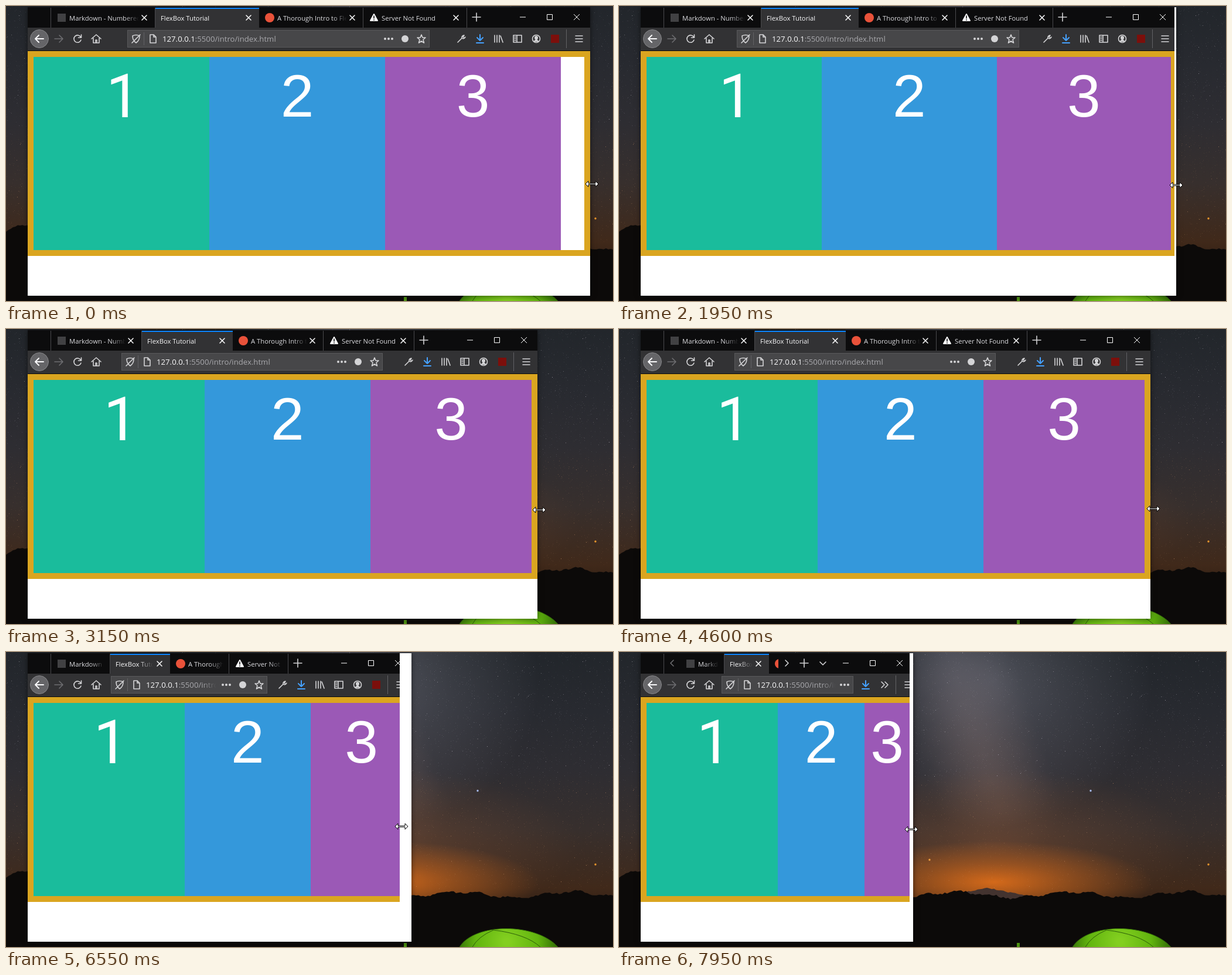
An HTML page with a canvas that plays this animation: 1036 by 504 pixels, repeating every 8000 ms.

```html
<!DOCTYPE html>
<html lang="en">
<head>
<meta charset="utf-8">
<title>Resizing a flexbox page</title>
<style>
html, body { margin: 0; width: 100%; height: 100%; overflow: hidden; background: #111; }
div, span, svg, canvas { position: absolute; box-sizing: border-box; }
#stage { left: 0; top: 0; width: 1036px; height: 504px; overflow: hidden; font: 11.25px 'Open Sans', 'Noto Sans', sans-serif; }
#win { left: 37px; top: 2px; height: 493px; background: #fff; box-shadow: 0 1px 9px rgba(0,0,0,.55); }
#clip { height: 493px; overflow: hidden; }
#chrome { height: 75px; background: #0c0c0d; }
#strip { top: 0; height: 35px; overflow: hidden; }
#edge { left: 39px; top: 1px; width: 1px; height: 34px; background: #4a4a4d; }
.tab { top: 1px; height: 34px; color: #dcdce0; border-right: 1px solid #4a4a4d; }
.tab.on { background: #323234; border-top: 2px solid #0a84ff; border-right: 0; color: #f9f9fa; }
.tab.on > * { margin-top: -2px; }
.label { top: 9px; line-height: 17px; white-space: nowrap; overflow: hidden; }
#tools { top: 35px; height: 39px; background: #323234; }
#bar { top: 4px; height: 30px; background: #474749; border: 1px solid #59595b; }
#url { left: 59px; top: 4px; font-size: 13.2px; line-height: 21px; color: #a9a9ad; }
#url b { font-weight: 400; color: #f9f9fa; }
.line { width: 1px; background: #626265; }
.end { right: 0; top: 0; }
.i { width: 16px; height: 16px; overflow: visible; fill: none; stroke: #d4d4d6; stroke-width: 1.6; stroke-linejoin: round; stroke-linecap: round; }
.thin { stroke: #fff; stroke-width: 1; stroke-linecap: butt; stroke-linejoin: miter; }
.bright { stroke: #f9f9fa; }
.dim { stroke: #6d6d70; }
.blue { stroke: #45a1ff; stroke-width: 2; }
.solid { fill: #d4d4d6; stroke: none; }
.small .wide, .big .slim, .room .more, .crowd .less { display: none; }
#page { top: 75px; height: 350px; border: 10px solid #daa520; background: #fff; display: flex; }
#page div { position: relative; width: 300px; padding: 10px; text-align: center;
  color: #fff; font: 102px/115px 'Liberation Sans', Arial, sans-serif; }
#page span { position: relative; left: 3px; font-family: Roboto, sans-serif; font-size: 104px; }
#cursor { width: 24px; height: 14px; fill: #fff; stroke: #000; }
</style>
</head>
<body>
<div id="stage">
  <canvas id="sky" width="1036" height="504"></canvas>
  <div id="win"><div id="clip">
    <div id="chrome"></div>
    <div id="page">
      <div style="background:#1abc9c;flex-shrink:1"><span>1</span></div>
      <div style="background:#3498db;flex-shrink:2">2</div>
      <div style="background:#9b59b6;flex-shrink:3">3</div>
    </div>
  </div></div>
  <svg id="cursor" viewBox="-12 -7 24 14"><path d="M-11 0l5-5v4h12v-4l5 5-5 5v-4h-12v4z"/></svg>
</div>
<script>
const $ = id => document.getElementById(id);

// Icon centred on x, y; a negative x counts from the right edge.
const icon = (x, y, d, cls = '', extra = '') =>
  `<svg class="i ${cls}" style="${x < 0 ? 'right' : 'left'}:${Math.abs(x) - 8}px;top:${y - 8}px" viewBox="-8 -8 16 16"><path d="${d}"/>${extra}</svg>`;
const dot = (x, r) => `M${x - r} 0a${r} ${r} 0 1 0 ${2 * r} 0a${r} ${r} 0 1 0 ${-2 * r} 0z`;
const square = color => `<rect x="-7" y="-7" width="14" height="14" fill="${color}" stroke="none"/>`;
const cross = 'M-4-4L4 4M4-4L-4 4', plus = 'M-7 0H7M0-7V7', more = dot(-6, 2) + dot(0, 2) + dot(6, 2);
const back = 'M7 0H-7M-1-6L-7 0-1 6', download = 'M0-7V3M-5-2L0 3 5-2M-6 7H6';

const tabs = [
  ['Markdown - Numbered Lists', icon(18, 17, '', '', square('#414143'))],
  ['FlexBox Tutorial', ''],
  ['A Thorough Intro to Flexing', icon(18, 17, '', '', '<circle r="8" fill="#e9523a" stroke="none"/>')],
  ['Server Not Found', icon(18, 17, 'M0-6L6 5H-6z', 'bright', '<path d="M0-6L6 5H-6z" fill="#f9f9fa"/><path d="M0-3V1M0 3.6V4" stroke="#0c0c0d"/>')]
];

$('chrome').innerHTML =
  '<div id="strip">' + tabs.map(([name, art], i) =>
    `<div class="tab ${i == 1 ? 'on' : ''}">${art}<div class="label" style="left:${art ? 31 : 9}px">${name}</div>` +
    `<div class="x end">${icon(-18, 17, cross, 'bright')}</div></div>`).join('') + '</div>' +
  '<div id="edge"></div>' +
  `<div class="more">${icon(53, 17, 'M3-5L-2 0 3 5', 'dim')}</div>` +
  `<div id="after">${icon(16, 17, plus, 'less')}<div class="more">${icon(14, 17, 'M-2-5L3 0-2 5')}${icon(44, 17, plus)}${icon(76, 17, 'M-5-2L0 3 5-2')}</div></div>` +
  icon(-115, 17, 'M-5 0H5', 'thin') + icon(-69, 17, 'M-4.5-4.5h9v9h-9z', 'thin') + icon(-23, 17, 'M-5-5L5 5M5-5L-5 5', 'thin') +
  '<div id="tools">' +
    icon(20, 19, '', 'bright', `<circle r="15.5" fill="#656568" stroke="#858588" stroke-width="1"/><path d="${back}" stroke-width="2"/>`) +
    icon(53, 19, 'M-7 0H7M1-6L7 0 1 6', 'dim') +
    icon(85, 19, 'M5.5-3A6.2 6.2 0 1 0 6 2M6.5-7V-2H1.5') +
    icon(117, 19, 'M-8 0L0-7 8 0M-5-1V7H5V-1M-1 7V2H1V7') +
    '<div id="bar">' +
      icon(14, 14, 'M-6-5Q0-8 6-5Q6 3 0 7Q-6 3-6-5M-7 7L7-7') +
      '<div class="line" style="left:27px;top:3px;height:22px"></div>' +
      icon(43, 14, 'M-5-7H1L5-3V7H-5zM1-7V-3H5') +
      '<div id="url" class="label"><b>127.0.0.1</b>:5500/intro/index.html</div>' +
      `<div class="wide end">${icon(-69, 14, more, 'solid')}${icon(-41, 14, dot(0, 6), 'solid')}` +
        icon(-13, 14, 'M0-7L2-2 7-2 3 1.5 4.5 7 0 4-4.5 7-3 1.5-7-2-2-2z') + '</div>' +
      `<div class="slim end">${icon(-14, 14, more, 'solid')}</div>` +
    '</div>' +
    '<div class="wide end">' +
      icon(-220, 19, 'M-6 6L1-1M1-1A4 4 0 0 1 5-6L3-3 5-1 7-3A4 4 0 0 1 1-1') +
      icon(-188, 19, download, 'blue') +
      icon(-156, 19, 'M-7-6V6M-3-6V6M1-6V6M3-5L7 6') +
      icon(-124, 19, 'M-7-6H7V6H-7zM-1-6V6M-5-3H-3M-5 0H-3M-5 3H-3') +
      icon(-92, 19, dot(0, 6.5), '', '<path class="solid" d="M-3-2a3 3 0 0 1 6 0Q3 1 1 2Q4 2 4 5H-4Q-4 2-1 2Q-3 1-3-2"/>') +
      icon(-60, 19, '', '', square('#7c0f0b')) + '</div>' +
    `<div class="slim end">${icon(-92, 19, download, 'blue')}${icon(-60, 19, 'M-5-5L0 0-5 5M1-5L6 0 1 5')}</div>` +
    '<div class="line" style="right:40px;top:3px;height:32px"></div>' +
    icon(-19, 19, 'M-6-5H6M-6 0H6M-6 5H6') +
  '</div>';

function paintSky() {
  const c = $('sky').getContext('2d');
  let seed = 7;
  const rnd = () => (seed = seed * 16807 % 2147483647) / 2147483647;
  const base = c.createLinearGradient(0, 0, 0, 504);
  ['#22262b', '#282a30', '#2e2d32', '#372f2d', '#40291a', '#1a100a']
    .forEach((col, i) => base.addColorStop(i / 5, col));
  c.fillStyle = base;
  c.fillRect(0, 0, 1036, 504);

  const glow = (x, y, rx, ry, rgb, a) => {
    c.save();
    c.translate(x, y);
    c.scale(rx, ry);
    const g = c.createRadialGradient(0, 0, 0, 0, 0, 1);
    g.addColorStop(0, `rgba(${rgb},${a})`);
    g.addColorStop(.45, `rgba(${rgb},${a * .5})`);
    g.addColorStop(1, `rgba(${rgb},0)`);
    c.fillStyle = g;
    c.fillRect(-1, -1, 2, 2);
    c.restore();
  };
  glow(640, 50, 270, 250, '150,150,165', .36);
  for (let i = 0; i < 7; i++) glow(560 + i * 15, i * 44, 110, 85, `${145 + i * 4},${142 - i * 3},${158 - i * 9}`, .17);
  glow(640, 330, 340, 130, '150,90,55', .4);
  glow(640, 393, 270, 70, '235,115,25', .85);

  // Fine stars, a few of them bright
  for (let i = 0; i < 7000; i++) {
    const far = rnd(), x = rnd() * 1036, y = rnd() * 405;
    c.fillStyle = `rgba(${y > 220 ? '205,150,105' : '195,190,200'},${.04 + .14 * far + .5 * far ** 40})`;
    c.fillRect(x | 0, y | 0, 1, 1);
  }
  const star = (x, y, col) => { c.fillStyle = col; c.beginPath(); c.arc(x, y, 1.7, 0, 7); c.fill(); };
  star(1006, 363, '#f59a2c');
  star(805, 237, '#a9bdf0');
  star(530, 355, '#f0a040');

  const land = (from, to, height, col) => {
    c.fillStyle = col;
    c.beginPath();
    c.moveTo(from, 504);
    for (let x = from; x <= to; x += 4) c.lineTo(x, height(x));
    c.lineTo(to, 504);
    c.fill();
  };
  land(560, 760, x => 402 + Math.abs(x - 628) * .2 + rnd() * 2, '#43332f');
  land(0, 1040, x => 413 - 5 * Math.cos((x - 770) / 31) - 2 * Math.sin(x / 9) + rnd() * 3
    - 42 * Math.exp(-(((x - 45) / 60) ** 2)), '#0c0a09');

  const green = c.createRadialGradient(855, 495, 5, 855, 495, 85);
  green.addColorStop(0, '#83cf20');
  green.addColorStop(.6, '#62b50f');
  green.addColorStop(1, '#347006');
  c.fillStyle = green;
  c.strokeStyle = '#2c5d08';
  c.beginPath();
  c.moveTo(774, 504);
  c.bezierCurveTo(800, 462, 905, 462, 942, 504);
  c.fill();
  c.moveTo(796, 504);
  c.quadraticCurveTo(806, 486, 832, 475);
  c.quadraticCurveTo(888, 482, 912, 504);
  c.stroke();
  c.fillStyle = '#4d9210';
  c.fillRect(679, 497, 5, 7);
}

// Pointer moves: start, end, x and y reached, power of the ease-out
const moves = [
  [1150, 1950, 951, 306, 1],
  [2000, 2600, 910, 307, 1],
  [4400, 4600, 912, 307, 1],
  [5050, 5700, 742, 297, 3],
  [6400, 7050, 580, 299, 2],
  [7600, 7950, 499, 303, 1.3]
];
const clamp = v => Math.min(1, Math.max(0, v));
function pointer(t) {
  let x = 1000, y = 304;
  for (const [start, end, toX, toY, power] of moves) {
    const k = 1 - (1 - clamp((t - start) / (end - start))) ** power;
    x += (toX - x) * k;
    y += (toY - y) * k;
  }
  // A short dip while the mouse button is up
  y += 15 * clamp(Math.min((t - 3100) / 400, (4600 - t) / 150));
  return [Math.floor(x), Math.round(y)];
}
// The window follows the pointer, except while it is released.
const edge = t => t > 2600 && t < 5100 ? 907 : pointer(t)[0] - 3;

const px = (el, prop, v) => el.style[prop] = v + 'px';
function fade(el) {
  const cut = el.scrollWidth > el.clientWidth;
  el.style.maskImage = cut ? 'linear-gradient(90deg,#000 calc(100% - 24px),transparent)' : 'none';
}

function draw(t) {
  const [x, y] = pointer(t);
  // Window bars and page are redrawn a little late.
  const seen = edge(t), right = edge(t - 50), laid = edge(t - 75);
  px($('cursor'), 'left', x - 12);
  px($('cursor'), 'top', y - 7);
  px($('win'), 'width', Math.max(seen, right) - 37);
  px($('clip'), 'width', seen - 37);
  px($('chrome'), 'width', right - 37);
  px($('page'), 'width', laid - 37);

  const fit = (right - 287) / 4, crowd = fit < 76, small = right < 660;
  $('chrome').className = (crowd ? 'crowd ' : 'room ') + (small ? 'small' : 'big');
  const tabW = Math.max(76, fit);
  const start = crowd ? 67 : 40;
  const stripW = crowd ? right - 267 - start : tabW * 4;
  px($('strip'), 'left', start);
  px($('strip'), 'width', stripW);
  px($('after'), 'left', start + stripW);
  document.querySelectorAll('.tab').forEach((tab, i) => {
    const closable = i == 1 || tabW > 130, label = tab.querySelector('.label');
    const left = Math.round(i * tabW);
    px(tab, 'left', left);
    px(tab, 'width', Math.round((i + 1) * tabW) - left);
    tab.querySelector('.x').style.display = closable ? '' : 'none';
    px(label, 'width', tabW - (i == 1 ? 9 : 31) - (closable ? 28 : 10));
    fade(label);
  });

  const fixed = small ? 108 : 237, room = right - 170 - fixed;
  const gap = Math.round(room * room * 1.06e-4), barW = Math.max(225, room - 2 * gap);
  px($('tools'), 'width', 133 + 2 * gap + barW + fixed);
  px($('bar'), 'left', 133 + gap);
  px($('bar'), 'width', barW);
  px($('url'), 'width', barW - 60 - (small ? 30 : 87));
  fade($('url'));
}

paintSky();
const began = performance.now();
function tick() {
  draw(Math.floor((performance.now() - began) % 8000 / 50) * 50);
  requestAnimationFrame(tick);
}
tick();
</script>
</body>
</html>
```
